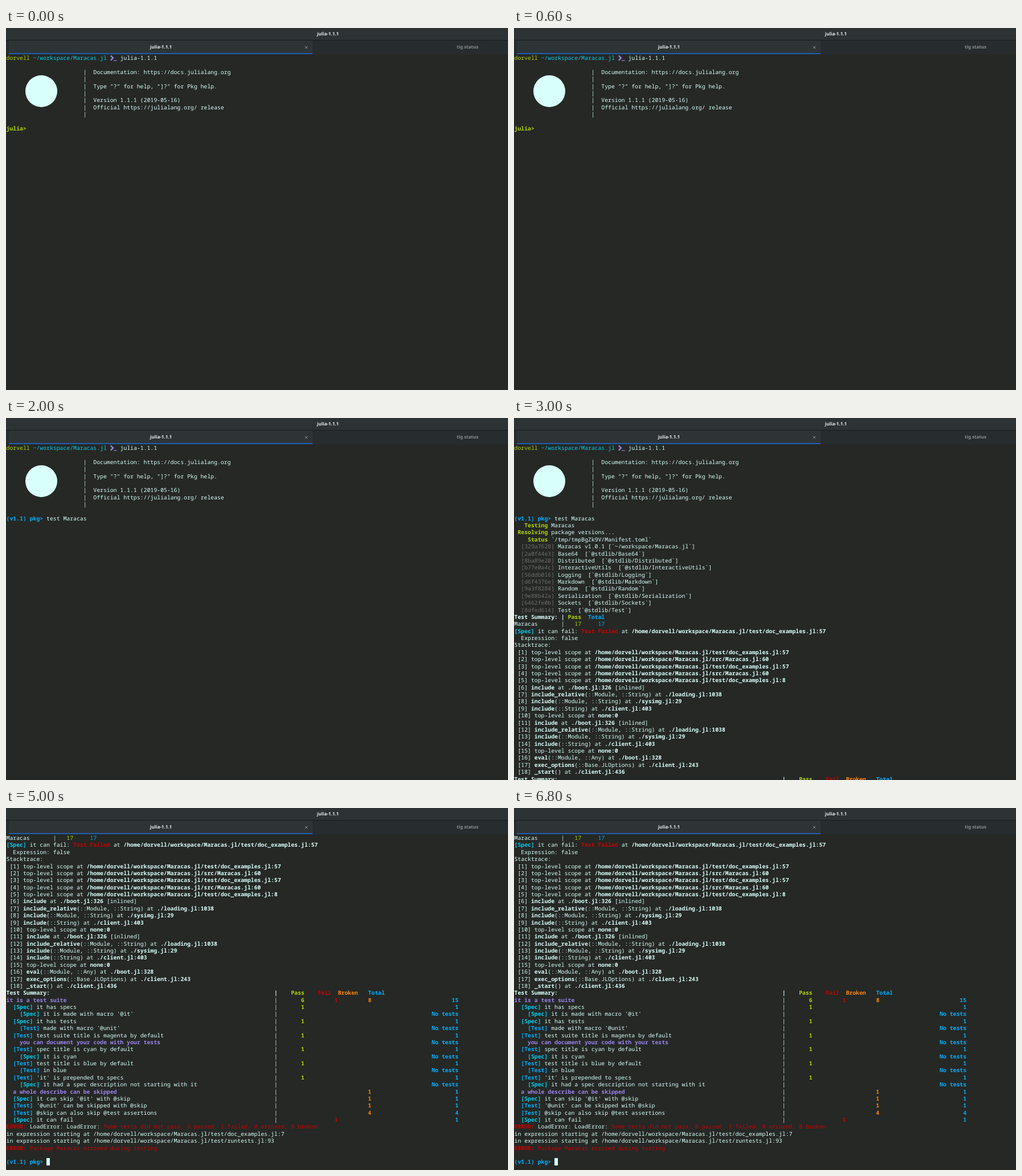
Recreate the animation shown at these times as an HTML page. Size 881 by 636 pixels, loop 8 s.

```html
<!DOCTYPE html>
<html lang="en">
<head>
<meta charset="utf-8">
<title>Terminal session</title>
<style>
  :root { --row: 12.37px; --fg: #d8fffa; --loop: 8s step-end infinite; }
  html, body { margin: 0; width: 100%; height: 100%; overflow: hidden; background: #252825; }
  #stage { position: relative; width: 881px; height: 636px; overflow: hidden; background: #252825; }
  #stage div, #stage pre, #stage svg { position: absolute; margin: 0; }

  .chrome { font: bold 8px/12px "Noto Sans", sans-serif; text-rendering: geometricPrecision; color: #eceeee; }
  .title { left: 0; top: 0; width: 881px; height: 21px; background: #2d3235; }
  .tabs { left: 0; top: 21px; width: 881px; height: 25px; background: #272c2e; box-shadow: inset 0 1px #191c1d; }
  .active { left: 5px; top: 1px; width: 533px; height: 24px; background: #2e3436; box-shadow: inset 0 -2px #215db0; }
  .label { width: 100px; text-align: center; white-space: nowrap; }
  .dim { color: #8b8f90; }

  .term { left: 0; top: 47px; width: 881px; height: 589px; overflow: hidden; }
  .log { left: 0; top: 0; animation: scroll var(--loop); }
  pre {
    left: .5px; color: var(--fg); white-space: pre;
    font: 9.8167px/var(--row) "Noto Sans Mono", monospace;
    text-rendering: geometricPrecision; font-variant-ligatures: none;
  }
  .prompt { top: calc(10 * var(--row)); }
  .output { top: calc(11 * var(--row)); animation: output var(--loop); }
  .julia { animation: julia var(--loop); }
  .pkg { animation: pkg var(--loop); }
  .typed { animation: typed var(--loop); }
  .cursor { background: var(--fg); }

  .g { color: #afd700; }
  .c { color: #00cdf0; }
  .b { color: #00afff; }
  .p { color: #9b82ee; }
  .r { color: #cc0000; }
  .o { color: #ff8700; }
  .h { color: #6c6f6c; }

  @keyframes julia { 0% { visibility: visible } 12.5%, 100% { visibility: hidden } }
  @keyframes pkg { 0% { visibility: hidden } 12.5% { visibility: visible } 25%, 100% { visibility: hidden } }
  @keyframes typed { 0% { visibility: hidden } 25%, 100% { visibility: visible } }
  @keyframes output { 0% { visibility: hidden } 37.5%, 100% { visibility: visible } }
  @keyframes scroll { 0% { top: 0 } 62.5%, 100% { top: calc(-25 * var(--row)) } }
</style>
</head>
<body>
<div id="stage">
  <div class="chrome title"><div class="label" style="left:515px;top:5px">julia-1.1.1</div></div>
  <div class="chrome tabs">
    <div class="active"></div>
    <div class="label" style="left:222px;top:7px">julia-1.1.1</div>
    <div class="label dim" style="left:760px;top:7px">tig status</div>
    <svg style="left:524px;top:10px" width="6" height="6"><path d="M.8 .8l4.4 4.4m0-4.4l-4.4 4.4" stroke="#8b8f90"/></svg>
  </div>

  <div class="term"><div class="log">
<pre>
<span class="g">dorvell</span> <span class="c">~/workspace/Maracas.jl</span>  <b class="p">_</b> julia-1.1.1

                       |  Documentation: https://docs.julialang.org
                       |
                       |  Type "?" for help, "]?" for Pkg help.
                       |
                       |  Version 1.1.1 (2019-05-16)
                       |  Official https://julialang.org/ release
                       |
</pre>
    <svg width="140" height="110" style="left:0;top:0"><circle cx="62" cy="64" r="28" fill="#d8fffa"/></svg>
    <svg width="10" height="12" style="left:182px;top:0"><path d="M1.8 1.5L5.8 5.6L1.8 9.8" fill="none" stroke="#9b82ee" stroke-width="2.4"/></svg>
<pre class="prompt julia"><b class="g">julia&gt;</b></pre>
<pre class="prompt pkg"><b class="b">(v1.1) pkg&gt;</b> <span class="cursor"> </span></pre>
<pre class="prompt typed"><b class="b">(v1.1) pkg&gt;</b> test Maracas</pre>
<pre class="output">
<b class="g">   Testing</b> Maracas
<b class="g"> Resolving</b> package versions...
<b class="g">    Status</b> `/tmp/tmpBgZk9V/Manifest.toml`
<span class="h">  [329a7628]</span> Maracas v1.0.1 [`~/workspace/Maracas.jl`]
<span id="stdlib"></span><b>Test Summary: | <span class="g">Pass</span>  <span class="b">Total</span></b>
Maracas       |   <span class="g">17</span>     <span class="b">17</span>
<b class="c">[Spec]</b> it can fail: <b class="r">Test Failed</b> at <b>/home/dorvell/workspace/Maracas.jl/test/doc_examples.jl:57</b>
  Expression: false
Stacktrace:
<span id="trace"></span><span id="summary"></span><b class="r">ERROR:</b> LoadError: LoadError: <span class="r">Some tests did not pass: 6 passed, 1 failed, 0 errored, 8 broken.</span>
in expression starting at /home/dorvell/workspace/Maracas.jl/test/doc_examples.jl:7
in expression starting at /home/dorvell/workspace/Maracas.jl/test/runtests.jl:93
<b class="r">ERROR:</b> <span class="r">Package Maracas errored during testing</span>

<b class="b">(v1.1) pkg&gt;</b> <span class="cursor"> </span>
</pre>
  </div></div>
</div>
<script>
  const bold = (text, color = '') => `<b class="${color}">${text}</b>`;
  const fill = (id, lines) => {
    document.getElementById(id).innerHTML = lines.map(line => line + '\n').join('');
  };

  const packages = {
    '2a0f44e3': 'Base64', '8ba89e20': 'Distributed', 'b77e0a4c': 'InteractiveUtils',
    '56ddb016': 'Logging', 'd6f4376e': 'Markdown', '9a3f8284': 'Random',
    '9e88b42a': 'Serialization', '6462fe0b': 'Sockets', '8dfed614': 'Test'
  };
  fill('stdlib', Object.entries(packages).map(([id, name]) =>
    `<span class="h">  [${id}]</span> ${name}  [\`@stdlib/${name}\`]`));

  const scope = place => 'top-level scope at ' + bold(place);
  const call = (name, args, place) => `${bold(name)}${args} at ${bold(place)}`;
  const root = '/home/dorvell/workspace/Maracas.jl';
  const include = [
    call('include', '', './boot.jl:326') + ' [inlined]',
    call('include_relative', '(::Module, ::String)', './loading.jl:1038'),
    call('include', '(::Module, ::String)', './sysimg.jl:29'),
    call('include', '(::String)', './client.jl:403'),
    scope('none:0')
  ];
  const nested = [scope(root + '/test/doc_examples.jl:57'), scope(root + '/src/Maracas.jl:60')];
  fill('trace', [
    ...nested, ...nested, scope(root + '/test/doc_examples.jl:8'),
    ...include, ...include,
    call('eval', '(::Module, ::Any)', './boot.jl:328'),
    call('exec_options', '(::Base.JLOptions)', './client.jl:243'),
    call('_start', '()', './client.jl:436')
  ].map((entry, i) => ` [${i + 1}] ${entry}`));

  // Right-aligns each cell at its end column after the divider in column 80.
  const colors = ['g', 'r', 'o', 'b'];
  function tableRow(label, length, cells, ends, bar = '|') {
    let line = label + ' '.repeat(80 - length) + bar, column = 81;
    cells.forEach((cell, i) => {
      const text = String(cell);
      if (!text) return;
      line += ' '.repeat(ends[i] - text.length - column) + bold(text, colors[i]);
      column = ends[i];
    });
    return line;
  }
  const tags = { S: bold('[Spec]', 'c') + ' ', T: bold('[Test]', 'b') + ' ' };
  function result(indent, tag, text, ...cells) {
    const label = ' '.repeat(indent) + (tag ? tags[tag] + text : bold(text, 'p'));
    return tableRow(label, indent + (tag ? 7 : 0) + text.length, cells, [89, 99, 109, 135]);
  }
  const passed = (tag, text) => result(2, tag, text, 1, '', '', 1);
  const empty = (tag, text) => result(4, tag, text, '', '', '', 'No tests');
  const broken = (tag, text, count) => result(2, tag, text, '', '', count, count);
  fill('summary', [
    tableRow(bold('Test Summary:'), 13, ['Pass', 'Fail', 'Broken', 'Total'], [89, 97, 105, 113], bold('|')),
    result(0, '', 'it is a test suite', 6, 1, 8, 15),
    passed('S', 'it has specs'),
    empty('S', "it is made with macro '@it'"),
    passed('S', 'it has tests'),
    empty('T', "made with macro '@unit'"),
    passed('T', 'test suite title is magenta by default'),
    empty('', 'you can document your code with your tests'),
    passed('T', 'spec title is cyan by default'),
    empty('S', 'it is cyan'),
    passed('T', 'test title is blue by default'),
    empty('T', 'in blue'),
    passed('T', "'it' is prepended to specs"),
    empty('S', 'it had a spec description not starting with it'),
    broken('', 'a whole describe can be skipped', 1),
    broken('S', "it can skip '@it' with @skip", 1),
    broken('T', "'@unit' can be skipped with @skip", 1),
    broken('T', '@skip can also skip @test assertions', 4),
    result(2, 'S', 'it can fail', '', 1, '', 1)
  ]);
</script>
</body>
</html>
```
